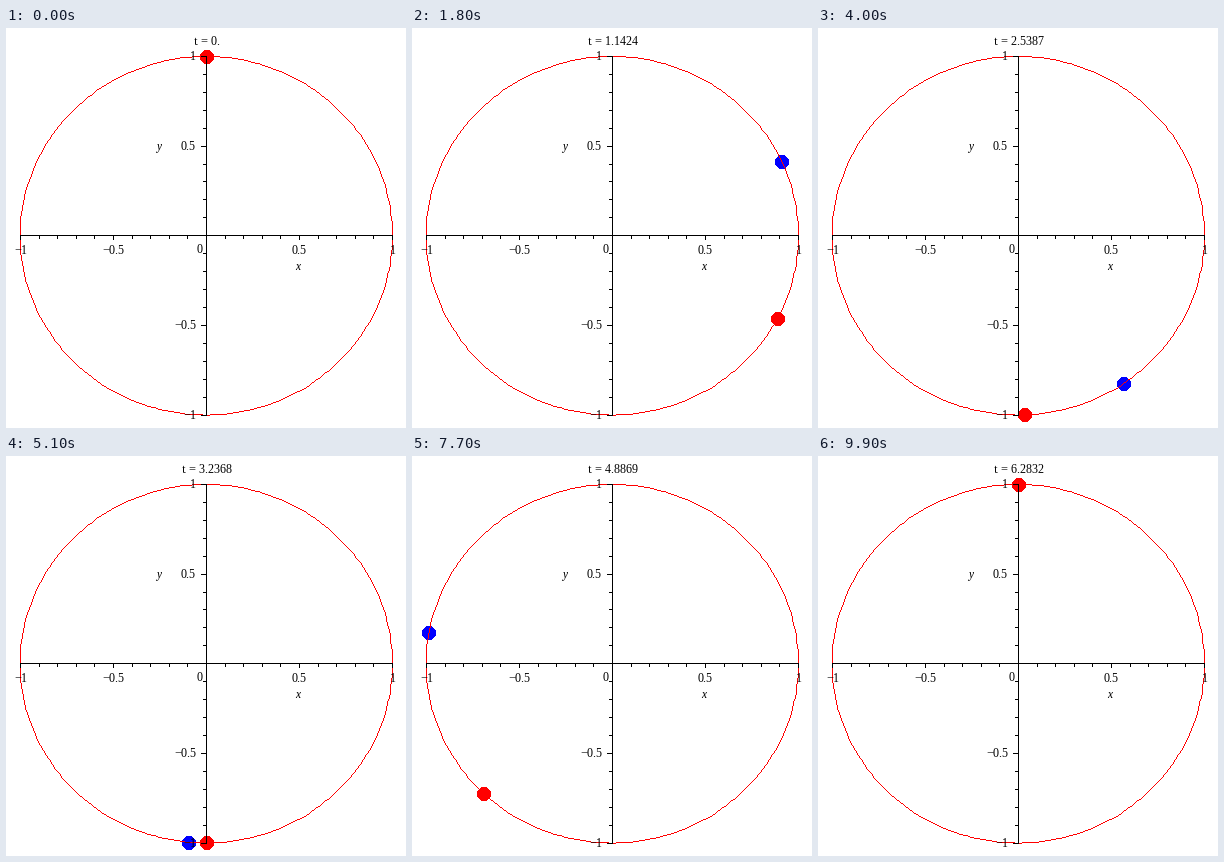
These frames come from a looping animation (400x400 px, 10 s). A matplotlib script:

```python
import numpy as np
import matplotlib.pyplot as plt
from matplotlib.animation import FuncAnimation
from matplotlib.collections import PolyCollection
from matplotlib.patches import Rectangle

SIZE, DPI, FRAMES = 400, 100, 100
PX = 72 / DPI  # points per pixel
CX, CY = 200.25, 207.75
RX, RY = 186.2, 179.25
RED, BLUE = "#ff0000", "#0000ff"
CORNERS = np.array([(0, 0), (1, 0), (1, 1), (0, 1)])

plt.rcParams.update({
    "font.family": "Liberation Serif",
    "font.size": 12 * PX,
    "text.hinting": "native",
    "text.hinting_factor": 1,
})

fig = plt.figure(figsize=(SIZE / DPI, SIZE / DPI), dpi=DPI, facecolor="white")
ax = fig.add_axes([0, 0, 1, 1])
ax.set_xlim(0, SIZE)
ax.set_ylim(SIZE, 0)
ax.axis("off")


def bar(x, y, w, h):
    ax.add_patch(Rectangle((x, y), w, h, fc="black", lw=0, aa=False, zorder=4))


def label(x, y, s, ha="center", **kw):
    return ax.text(x, y, s, ha=ha, va="baseline", zorder=5, **kw)


def squares(points):
    return points[:, None] + CORNERS


def pixels(points, color, z):
    """Unsmoothed unit squares with their corners at the given points."""
    cells = PolyCollection(squares(points), facecolors=color, linewidths=0,
                           antialiaseds=False, zorder=z)
    return ax.add_collection(cells, autolim=False)


def on_circle(angle):
    """Whole pixel on the circle, clockwise from the top."""
    xy = (CX + RX * np.sin(angle), CY - RY * np.cos(angle))
    return np.floor(np.stack(xy, axis=-1) + 1e-6)


def segment(p, q):
    n = int(np.abs(q - p).max())
    return np.floor(np.linspace(p, q, n, endpoint=False) + 0.5)


def number(t):
    """Five significant digits without a leading zero."""
    if t == 0:
        return "0."
    if t >= 1:
        return f"{t:.4f}"
    if t >= 0.1:
        return f"{t:.5f}"[1:]
    return f"{10 * t:.5f}"[1:] + "e-1"


# Axes with ticks
bar(14, 207, 373, 1)
bar(200, 28, 1, 360)
for k in range(-10, 11):
    if k == 0:
        continue
    major = k % 5 == 0
    bar(np.floor(200.5 + 18.6 * k), 207, 1, 5 if major else 4)
    size = 5 if major else 3
    bar(200 - size, np.floor(CY - RY * k / 10), size, 1)

for v, s in ((-1, "\u22121"), (-0.5, "\u22120.5"), (0.5, "0.5"), (1, "1")):
    label(200.5 + 186 * v, 226, s)
    label(190, np.floor(CY - RY * v) + 4, s, ha="right")
label(193.5, 225, "0")
label(291.5, 242, "x", style="italic")
label(153, 122, "y", style="italic")

# Unit circle
rim = on_circle(np.linspace(0, 2 * np.pi, 201))
pixels(np.concatenate([segment(p, q) for p, q in zip(rim, rim[1:])]), RED, 3)

# Dots, 14 pixels wide
grid = np.stack(np.meshgrid(np.arange(-7, 7), np.arange(-7, 7)), -1).reshape(-1, 2)
disc = grid[np.hypot(*(grid + 0.5).T) < 7]
blue = pixels(disc, BLUE, 1)
red = pixels(disc, RED, 2)
title = label(201, 17, "")


def draw(i):
    t = 2 * np.pi * i / (FRAMES - 1)
    for dot, angle in ((blue, t), (red, t + np.sin(t))):
        dot.set_verts(squares(disc + on_circle(angle) + 1))
    title.set_text("t = " + number(t))
    return blue, red, title


anim = FuncAnimation(fig, draw, frames=FRAMES, interval=100,
                     repeat=True, repeat_delay=0)
plt.show()
```
